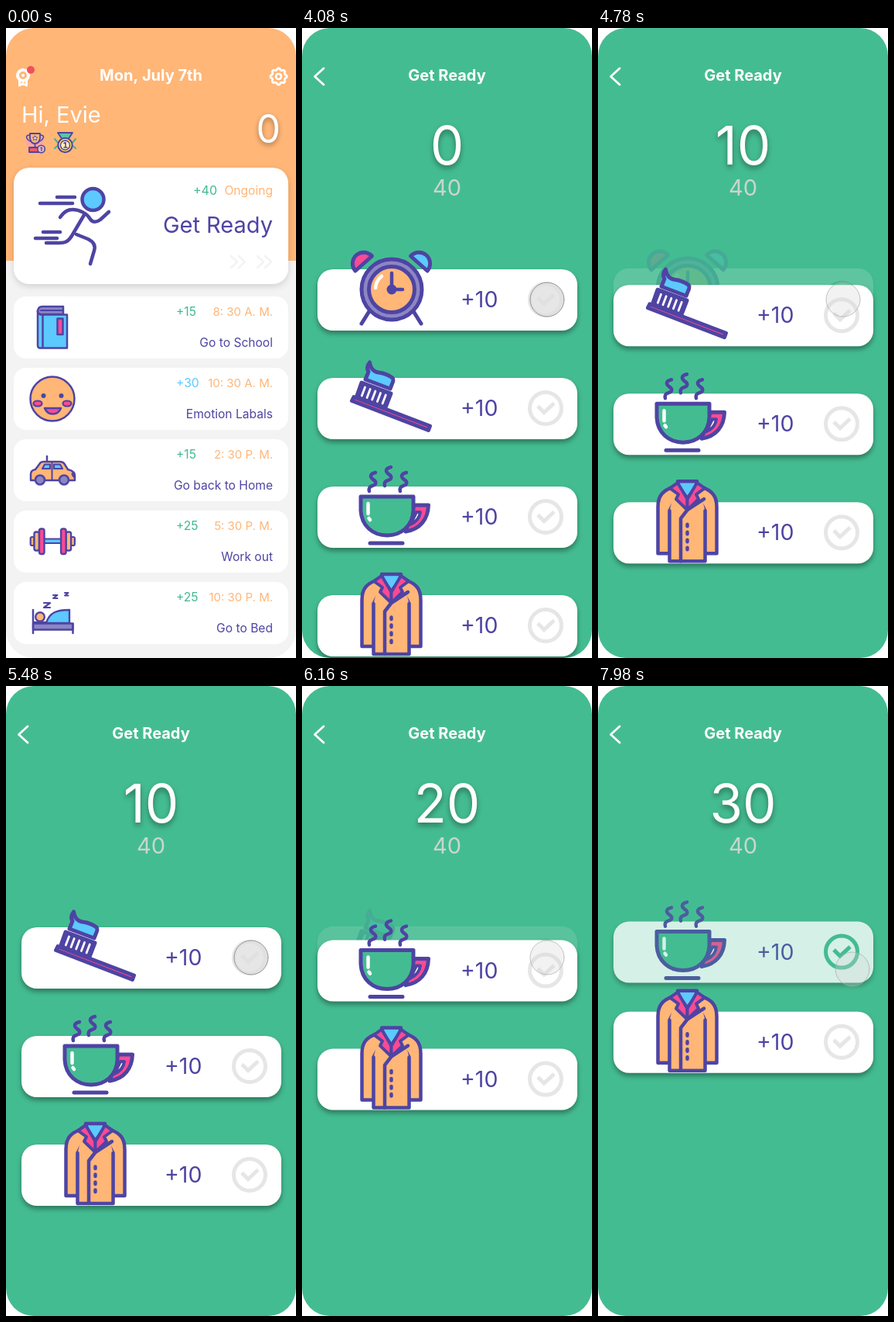
An HTML page with a canvas for the animation above (8 s loop, 375 by 812 pixels).

```html
<!DOCTYPE html>
<html lang="en">
<head>
<meta charset="utf-8">
<title>Daily routine</title>
<style>
html, body { margin: 0; width: 100%; height: 100%; overflow: hidden; background: #fff; }
canvas { display: block; width: 375px; height: 812px; }
</style>
</head>
<body>
<canvas id="stage"></canvas>
<script>
const W = 375, H = 812, LOOP = 8000;
const INK = '#4e44a3', PINK = '#fb4a94', BLUE = '#5cc9ff', PEACH = '#ffb677';
const LILAC = '#8c86c4', GREEN = '#44bc92', WHITE = '#fff', PALE = '#e6e6e6';
const FONT = 'Inter, Roboto, sans-serif';
const dpr = window.devicePixelRatio || 1;

const stage = document.getElementById('stage');
const layer = document.createElement('canvas');
for (const c of [stage, layer]) { c.width = W * dpr; c.height = H * dpr; }
const main = stage.getContext('2d'), side = layer.getContext('2d');
let g = main;

// ---------- drawing helpers ----------
function shape(d, fill, lw, color = INK) {
  const p = typeof d === 'string' ? new Path2D(d) : d;
  if (fill) { g.fillStyle = fill; g.fill(p); }
  if (lw) {
    g.lineWidth = lw; g.strokeStyle = color;
    g.lineCap = g.lineJoin = 'round';
    g.stroke(p);
  }
}
function oval(x, y, rx, ry, fill, lw, color) {
  const p = new Path2D();
  p.ellipse(x, y, rx, ry, 0, 0, 7);
  shape(p, fill, lw, color);
}
const disc = (x, y, r, fill, lw, color) => oval(x, y, r, r, fill, lw, color);
function box(x, y, w, h, r, fill, lw, color) {
  const p = new Path2D();
  p.roundRect(x, y, w, h, r);
  shape(p, fill, lw, color);
}
function shadow(alpha, dy, blur, draw) {
  g.save();
  g.shadowColor = `rgba(0,0,0,${alpha})`;
  g.shadowOffsetY = dy * dpr;
  g.shadowBlur = blur * dpr;
  draw();
  g.restore();
}
function text(s, x, y, size, color, align = 'left', weight = 400) {
  g.font = `${weight} ${size}px ${FONT}`;
  g.textAlign = align;
  g.fillStyle = color;
  g.fillText(s, x, y);
}
function faded(alpha, draw) {
  g.save();
  g.globalAlpha *= alpha;
  draw();
  g.restore();
}
function mirrored(cx, draw) {
  draw(false);
  g.save();
  g.translate(2 * cx, 0);
  g.scale(-1, 1);
  draw(true);
  g.restore();
}

// ---------- timing helpers ----------
const clamp = v => Math.min(1, Math.max(0, v));
const span = (t, a, b) => clamp((t - a) / (b - a));
const cubic = (a, b, c, d, s) => {
  const r = 1 - s;
  return r * r * r * a + 3 * r * r * s * b + 3 * r * s * s * c + s * s * s * d;
};
function bezier(x1, y1, x2, y2) {
  return v => {
    let lo = 0, hi = 1;
    for (let i = 0; i < 22; i++) {
      const m = (lo + hi) / 2;
      if (cubic(0, x1, x2, 1, m) < v) lo = m; else hi = m;
    }
    return v <= 0 ? 0 : v >= 1 ? 1 : cubic(0, y1, y2, 1, lo);
  };
}
const glide = bezier(.42, 0, .4, 1), smooth = bezier(.42, 0, .58, 1), settle = bezier(.2, .3, .4, 1);

// ---------- home screen ----------
function runner() {
  shape('M66 218H89M44 226H86M48 263H70M38 271H66', null, 4.5);
  shape('M70 244C76 236 80 234 86 234C96 234 105 240 108 245C112 252 118 250 122 247L133 237', null, 4.5);
  shape('M101 241L85 268C80 276 76 277 69 277H52', null, 4.5);
  shape('M91 266L106 272C114 276 116 281 114 287L109 304', null, 4.5);
  disc(112.5, 221, 14, BLUE, 4.5);
}
function book() {
  shape('M41 366Q41 359 47 359H74V369H45Q41 369 41 364Z', LILAC, 2.5);
  shape('M45 364H73', null, 2);
  shape('M41 364V409Q41 412.500 44 412.500H79V369.500H45Q41 369 41 364Z', BLUE, 2.5);
  shape('M47.500 370V412', null, 2.5);
  box(66.500, 374.500, 7, 20.500, 0, PINK, 2.5);
}
function face() {
  disc(60, 478, 28.5, PEACH, 2.5);
  mirrored(60, () => {
    disc(48.5, 474, 3, INK);
    oval(41, 484, 5.5, 3.5, PINK, 2.2);
  });
  shape('M50 490H71Q68 497.500 60.500 497.500T50 490Z', PINK, 2.5);
}
function car() {
  shape('M53 552V559', null, 2.5);
  shape('M32 583V575Q32 570 38 569L44 561Q45 559 49 559H70Q73 559 75 561L80 569Q89 571 89 577V583Z', PEACH, 2.5);
  shape('M47 568L50 562.500H57V568Z', BLUE, 2.2);
  shape('M62 568V562.500H70L73 568Z', BLUE, 2.2);
  shape('M59.500 560V583', null, 2);
  shape('M88 573Q83 574 88 579Z', PINK, 2);
  disc(44, 582.5, 6, LILAC, 2.5);
  disc(75, 582.5, 6, LILAC, 2.5);
}
function dumbbell() {
  box(49, 658.500, 23, 5.5, 0, BLUE, 2.2);
  mirrored(60.3, () => {
    box(31.700, 656, 5, 11, 2, PEACH, 2.2);
    box(36.500, 649.500, 6.500, 24, 2.5, PEACH, 2.4);
    box(43, 645.500, 6.500, 32.500, 2.5, PINK, 2.4);
  });
}
function zed(x, y, w, h, lw) {
  shape(`M${x} ${y}h${w}l${-w} ${h}h${w}`, null, lw);
}
function bed() {
  zed(49, 741, 8, 6, 2.2);
  zed(61, 731, 5.5, 4, 2);
  zed(76, 728, 4.5, 3.5, 2);
  shape('M52 767C56 753 66 750 82 750V767Z', BLUE, 2.4);
  shape('M36 766H52', null, 2.4);
  disc(44, 759, 5.8, PEACH, 2.4);
  box(35, 767.500, 51.500, 8, 0, LILAC, 2.4);
  shape('M35 750V780M86.500 768V780', null, 2.5);
}
function badges() {
  disc(37, 147, 11, '#f9a8a0');
  shape('M31 138Q25 138 27 142T33 146M44 138Q50 138 48 142T42 146', null, 1.6);
  shape('M31 136H44V142Q43 149 37.500 149T31 142Z', PEACH, 1.8);
  shape('M37.500 149V154M30 160H45V154H30Z', '#ef5a63', 1.8);
  shape('M37.500 139l1 2h2l-1.500 1.500l.5 2l-2 -1l-2 1l.5 -2l-1.500 -1.500h2Z', WHITE, 1);
  disc(45.500, 156, 4.8, '#e9b5c0', 1.6);
  shape('M45 154.500L46 154V158', null, 1.3);

  shape('M67 135L73 144H80L86 135Z', '#59c7a5', 1.8);
  shape('M63 143L69 150L63 155M90 143L84 150L90 155', null, 2, '#3fb58d');
  disc(76.5, 151, 9.2, '#ffd15c', 2);
  disc(76.5, 151, 6, '#fff0b5', 1.4);
  shape('M75 148.500L77 147.500V154M75 154H79', null, 1.6);
}
function topIcons() {
  disc(22, 61, 7, null, 4, WHITE);
  disc(22, 61, 2, WHITE);
  shape('M17.500 68V74L22 71.500L26.500 74V68', null, 3, WHITE);
  disc(32, 54, 5, '#ee525c');
  const gear = new Path2D();
  for (let i = 0; i <= 96; i++) {
    const a = i / 96 * Math.PI * 2;
    const r = 9.6 + .95 * Math.tanh(2.2 * Math.cos(8 * a));
    gear.lineTo(352.5 + r * Math.cos(a), 62.5 + r * Math.sin(a));
  }
  gear.closePath();
  shape(gear, null, 2.8, WHITE);
  disc(352.5, 62.5, 3.5, null, 2.6, WHITE);
}
const plan = [
  ['+15', '8: 30 A. M.', 'Go to School', book],
  ['+30', '10: 30 A. M.', 'Emotion Labals', face],
  ['+15', '2: 30 P. M.', 'Go back to Home', car],
  ['+25', '5: 30 P. M.', 'Work out', dumbbell],
  ['+25', '10: 30 P. M.', 'Go to Bed', bed]
];
function home() {
  g.fillStyle = '#f3f3f3';
  g.fillRect(0, 0, W, H);
  g.fillStyle = PEACH;
  g.fillRect(0, 0, W, 300);
  topIcons();
  text('Mon, July 7th', 187.5, 68, 20, WHITE, 'center', 700);
  text('Hi, Evie', 20, 122, 29, WHITE);
  badges();
  shadow(.35, 3, 6, () => text('0', 355, 148, 50, WHITE, 'right'));

  shadow(.14, 3, 9, () => box(10, 180, 355, 150, 20, WHITE));
  runner();
  text('+40', 242, 215, 16, '#3fba8d');
  text('Ongoing', 345, 215, 15.6, PEACH, 'right');
  text('Get Ready', 345, 264, 29, INK, 'right');
  for (const x of [291, 301, 325, 335]) shape(`M${x} 294l8 7.500l-8 7.500`, null, 2.6, '#f3f3f3');

  plan.forEach(([points, time, name, icon], i) => {
    const y = 346 + 92 * i;
    box(10, y, 355, 80, 16, WHITE);
    icon();
    text(points, 220, y + 25, 15.6, i === 1 ? BLUE : '#3fba8d');
    text(time, 345, y + 25, 15, PEACH, 'right');
    text(name, 345, y + 65, 15.6, INK, 'right');
  });
}

// ---------- checklist screen ----------
function alarm() {
  shape('M87 365L77 381M144 365L154 381', null, 5);
  mirrored(115.5, flip => {
    shape('M90.500 294A13.200 13.200 0 0 0 69 313Z', flip ? BLUE : PINK, 5);
  });
  disc(116, 337, 39, LILAC, 5);
  disc(116, 337, 29.5, PEACH, 5);
  shape('M95 335A21 21 0 0 1 103 320', null, 4.5, WHITE);
  shape('M116 316V337H130', null, 4.5);
  disc(116, 337, 6.5, INK);
}
function brush() {
  shape('M71 474L77 457L115 471L108 489Z', INK, 5);
  for (let k = 0; k < 5; k++) shape(`M${81.500 + 6.700 * k} ${463 + 2.500 * k}l-4.200 11`, null, 2.8, WHITE);
  shape('M82 453L86 443C83 438 85 434 87.500 431C89 440 93 443 99 444C106 445 112 447 117 451C119 453 117.500 457 116 460L114 465Z', BLUE, 5);
  shape('M67 475.500L165.500 513L163.500 518.500L64.500 480.500Z', PINK, 5);
}
function cup() {
  for (const [x, y] of [[91, 573], [111, 566], [131, 573]])
    shape(`M${x + 4} ${y}c-8 2 -7 6 -3 9c5 3 4 7 -1 8c-4 1 -5 4 -4 7`, null, 4.5);
  shape('M145 615H163.500C163 633 153 646 134 649Z', PINK, 5);
  shape('M148 624H153C152 632 147 637 140 640Z', WHITE, 4);
  shape('M76 604H144V622C143 642 128 654 110 654S77 642 76 622Z', GREEN, 5);
  shape('M85.500 613V626M86.500 632L88 634', null, 4.5, WHITE);
  shape('M88 664H130', null, 5);
}
function coat() {
  mirrored(115.5, () => shape('M98 711C84 716 77.500 722 77.500 737V797H93V741L106 716Z', PEACH, 4.5));
  shape('M92.500 742V807H138.500V742L131 712H100Z', PEACH);
  shape('M92.500 742V807H138.500V742', null, 4.5);
  shape('M103 704H128L126 712L115.500 726L105 712Z', BLUE, 4.5);
  mirrored(115.5, () => shape('M103 706L93 713L104 721L101 727L115.500 741V727Z', PINK, 4));
  shape('M115.500 741L107 752V807M115.500 741L137 727', null, 4.5);
  shape('M115.500 759.500v2.500m0 7.500v2.500m0 7.500v2.500m0 7.500v2.500', null, 4.5);
}
const icons = [alarm, brush, cup, coat];
const taps = [4225, 5595, 7560];
const lift = (t, k) => k < taps.length ? smooth(span(t, taps[k], taps[k] + 300)) : 0;
const leave = (t, k) => k < taps.length ? glide(span(t, taps[k] + 314, taps[k] + 680)) : 0;

function tick(color) {
  disc(315, 350, 20.5, null, 5, color);
  g.lineCap = 'butt';
  g.lineJoin = 'miter';
  g.stroke(new Path2D('M305 347.500L313 355.500L326 343.500'));
}
function row(k, y, done) {
  const base = 311 + 140 * k;
  shadow(.36, 4, 6, () => box(20, y, 336, 79, 20, WHITE));
  g.save();
  g.translate(0, y - base);
  icons[k]();
  g.translate(0, base - 311);
  text('+10', 205, 360, 28.5, INK);
  tick(PALE);
  if (done) faded(done, () => tick(GREEN));
  g.restore();
}
function checklist(t) {
  g.fillStyle = GREEN;
  g.fillRect(0, 0, W, H);
  shape('M28 52L16.500 62.500L28 73', null, 2.8, WHITE);
  text('Get Ready', 187.5, 68, 20, WHITE, 'center', 700);

  let score = 0;
  while (score < 3 && lift(t, score) >= 1) score++;
  const mix = lift(t, score);
  const count = n => shadow(.38, 4, 7, () => text(n * 10, 187.5, 176, 69, WHITE, 'center'));
  if (mix < 1) faded(1 - mix, () => count(score));
  if (mix > 0) faded(mix, () => count(score + 1));
  text('40', 187.5, 216, 29, '#c9d6cf', 'center');

  let up = 0;
  for (let k = 0; k < 4; k++) {
    const out = leave(t, k), done = lift(t, k);
    const y = 311 + 140 * (k - up) - 9.5 * done * (1 - out);
    up += out;
    if (out >= 1) continue;
    if (out === 0) { row(k, y, done); continue; }
    // compose the leaving row as one group so that it fades evenly
    g = side;
    g.setTransform(dpr, 0, 0, dpr, 0, 0);
    g.clearRect(0, 0, W, H);
    row(k, y, done);
    g = main;
    faded(1 - out, () => g.drawImage(layer, 0, 0, W, H));
  }
}

// ---------- pointer ----------
const presses = [[1800, 1920], [4080, 4220], [5480, 5600], [7440, 7560]];
function pointerAt(t) {
  if (t < 3110) return [398 - 100 * settle(span(t, 490, 940)), 288];
  if (t < 6400) {
    const s = smooth(span(t, 3110, 3740));
    return [298 + 19 * s, 288 + 62 * s];
  }
  const s = smooth(span(t, 6400, 7000));
  return [cubic(317, 340, 375, 329, s), cubic(350, 312, 330, 365, s)];
}
function pointer(t) {
  if (t < 500) return;
  const [x, y] = pointerAt(t);
  const down = presses.some(([a, b]) => t >= a && t < b);
  disc(x, y, 22, down ? 'rgba(222,222,222,.75)' : 'rgba(213,213,213,.3)');
  const rim = down ? 'rgba(140,140,140,.9)' : t >= 1920 && t < 3400 ? 'rgba(225,232,228,.6)' : 'rgba(165,165,165,.65)';
  disc(x, y, 22, null, 1, rim);
}

function frame() {
  const t = performance.now() % LOOP;
  g = main;
  g.setTransform(dpr, 0, 0, dpr, 0, 0);
  g.fillStyle = WHITE;
  g.fillRect(0, 0, W, H);
  g.save();
  const screen = new Path2D();
  screen.roundRect(0, 0, W, H, 36);
  g.clip(screen);
  if (t < 1920) home(); else checklist(t);
  pointer(t);
  g.restore();
  requestAnimationFrame(frame);
}
frame();
</script>
</body>
</html>
```
